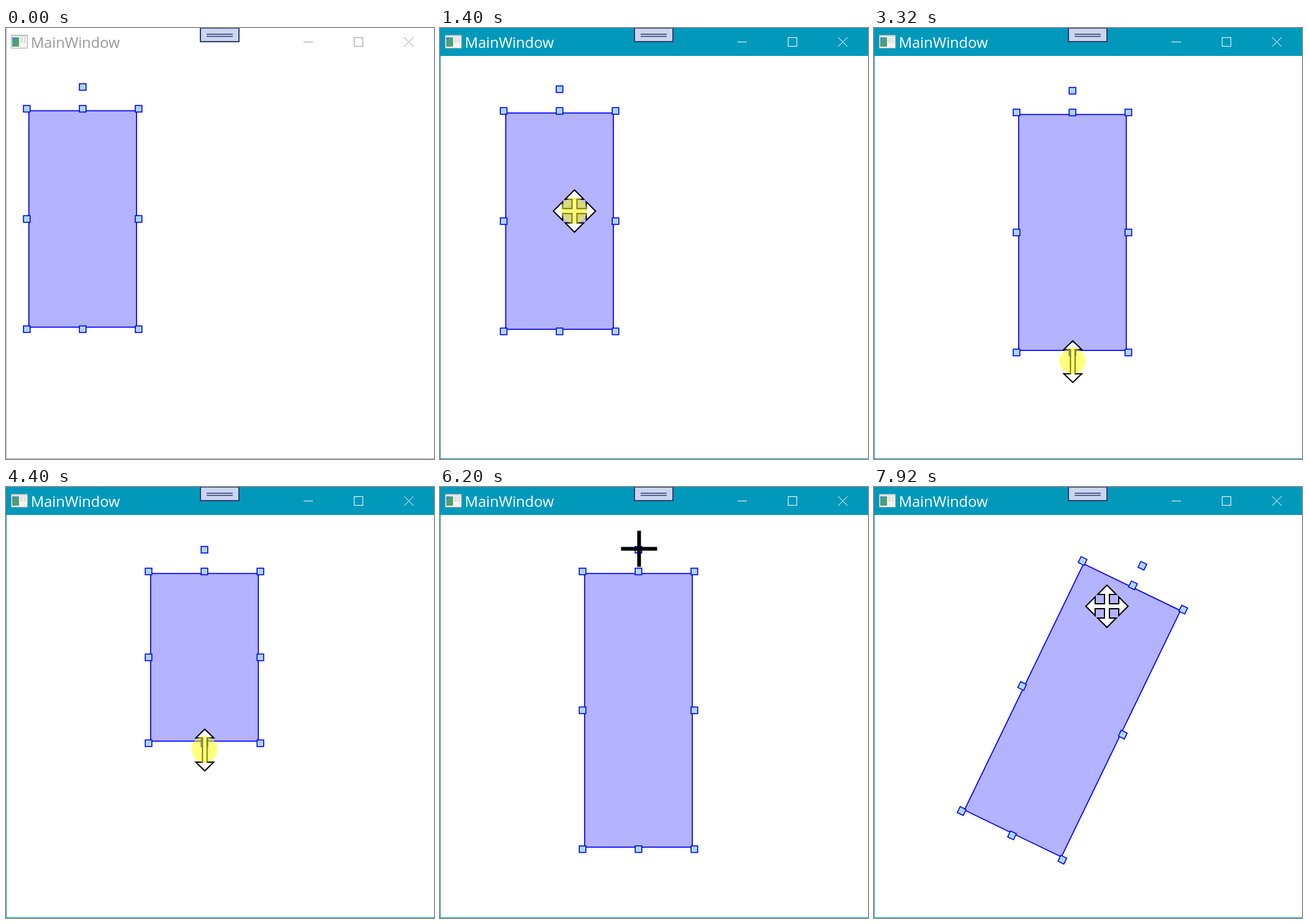
These frames come from a looping animation (689x694 px, 8 s). An HTML page:

```html
<!DOCTYPE html>
<html lang="en">
<head>
<meta charset="utf-8">
<title>MainWindow</title>
<style>
  html, body { margin: 0; width: 100%; height: 100%; overflow: hidden; background: #fff; }
  svg { display: block; width: 689px; height: 694px; --bar: #fff; --edge: #aaa; --ink: #999; }
  svg.active { --bar: #0099bc; --edge: #0099bc; --ink: #fff; }
  .bar { fill: var(--bar); }
  .edge { fill: var(--edge); }
  .title { fill: var(--ink); font: 23.5px "Open Sans", "Noto Sans", sans-serif; }
  .buttons { fill: none; stroke: var(--ink); }
  .body { fill: #b3b3ff; stroke: #00f; stroke-width: 1.7; }
  .handle { fill: #add8e6; stroke: #00f; stroke-width: 1.6; }
  .tab { fill: #ccd5f0; stroke: #343c6c; stroke-width: 2; }
</style>
</head>
<body>
<svg id="stage" viewBox="0 0 689 694">
  <rect width="689" height="694" fill="#fff"/>
  <rect class="bar" width="689" height="45"/>
  <path class="edge" d="M0 0H1V693H689V694H0z"/>
  <g>
    <rect x="8.5" y="11.5" width="26" height="21" fill="#f4f4f2" stroke="#aaa"/>
    <path d="M9 12H34V14H9z" fill="#d5d9dd"/>
    <path d="M10 15H21V30H10z" fill="#4a9c9c"/>
    <path d="M10 24L21 17V30H10z" fill="#4f9f72"/>
    <path d="M10 15H15L10 22z" fill="#4c86b4"/>
    <path d="M23 16.5H27M23 19.5H27M23 22.5H27M29 16.5H32M29 19.5H32M29 22.5H32" stroke="#b5bbb8"/>
  </g>
  <text class="title" x="40" y="32">MainWindow</text>
  <g class="buttons">
    <path d="M479 22.5H494M641 15L656 30M656 15L641 30"/>
    <rect x="560.5" y="15.5" width="14" height="14"/>
  </g>
  <rect class="tab" x="313" y="0" width="62" height="22"/>
  <path d="M323 10H365M323 13.5H365" stroke="#343c6c" stroke-width="1.5"/>
  <g id="shape"><rect id="body" class="body" x="-86.7" width="173.4"/></g>
  <g id="cursor">
    <path id="pointer" stroke="#000" stroke-width="2"/>
    <circle id="press" cx="-.5" cy="-1" r="21" fill="#ff0" fill-opacity=".5"/>
  </g>
</svg>
<script>
const $ = id => document.getElementById(id);
const LOOP = 8000, RAD = Math.PI / 180;
const GAP = 3.3, STEM = 35, LEAD = 0.4;

const pointers = {
  arrow: 'M1 1V49L12 39L19 56L26 53L19 36H34z',
  move: 'M0-34L15-19H4V-4H19V-15L34 0L19 15V4H4V19H15L0 34L-15 19H-4V4H-19V15L-34 0L-19-15V-4H-4V-19H-15z',
  size: 'M0-33.5L14.5-19.5H3.7V19.5H14.5L0 33.5L-14.5 19.5H-3.7V-19.5H-14.5z',
  cross: 'M-28.5-1.5H-2.5V-27.5H3.5V-1.5H29.5V4.5H3.5V30.5H-2.5V4.5H-28.5z'
};

const smooth = s => s * s * (3 - 2 * s);
const swing = s => Math.sin(s * Math.PI / 2);
const settle = s => 1 - (1 - s) ** 3;

// Times are in tenths of a second
function ramp(k, from, to, ease = smooth) {
  return ease(Math.min(1, Math.max(0, (k - from) / (to - from))));
}

function glide(k, from, to, [x0, y0], [x1, y1], ease, bow = 0) {
  const s = ramp(k, from, to, ease);
  return [x0 + (x1 - x0) * s + bow * Math.sin(s * Math.PI), y0 + (y1 - y0) * s];
}

// Dragged across, stretched, squeezed, stretched again, then turned
function shapeAt(k) {
  const dx = 196 * ramp(k, 10, 20), dy = 6 * ramp(k, 10, 20, swing);
  const h = 348.4 + 85.6 * ramp(k, 30, 37.3) - 164 * ramp(k, 37.3, 44) + 170.6 * ramp(k, 44, 49);
  const angle = 25.8 * ramp(k, 66.4, 76, swing);
  return { dx, dy, h, angle, cx: 123.5 + dx, cy: 133.3 + dy + h / 2 };
}

// While a button is held the hand runs slightly ahead of the shape
const held = {
  move({ dx, dy }) { return [136 + dx, 291 + dy]; },
  size({ h }) { return [320, 150.4 + h]; },
  cross({ cx, cy, angle }) {
    const r = 261 + angle * 0.55, a = angle * 1.04 * RAD;
    return [cx + r * Math.sin(a), cy - r * Math.cos(a)];
  }
};
const grab = (kind, k) => held[kind](shapeAt(k + LEAD));

const below = [321, 518], above = [321, 92], knob = [320, 98];
const stages = [
  { start: 2, at: k => glide(k, 2, 9, [473, 598], grab('move', 9)) },
  { start: 11, drag: 'move' },
  { start: 20, at: k => glide(k, 20, 26, grab('move', 20), below) },
  { start: 26, at: k => glide(k, 26, 28, below, grab('size', 28)) },
  { start: 31, drag: 'size' },
  { start: 49, at: k => glide(k, 50, 55.7, grab('size', 49), above, settle, 46) },
  { start: 59, at: k => glide(k, 59, 61, above, knob) },
  { start: 66, drag: 'cross' },
  { start: 78, at: k => glide(k, 77, 79, grab('cross', 77), [375, 192]) }
];

// Pointer for whatever lies under a free cursor
function hover([px, py], { cx, cy, h, angle }) {
  const c = Math.cos(angle * RAD), s = Math.sin(angle * RAD);
  const x = (px - cx) * c + (py - cy) * s, y = (py - cy) * c - (px - cx) * s;
  const near = edge => Math.abs(x) < 8 && Math.abs(y - edge) < 8;
  if (near(-h / 2 - GAP - STEM)) return 'cross';
  if (near(h / 2 + GAP)) return 'size';
  return Math.abs(x) < 87 && Math.abs(y) < h / 2 ? 'move' : 'arrow';
}

function set(node, attrs) {
  for (const name in attrs) node.setAttribute(name, attrs[name]);
}

const grips = [];
function addGrip(x, y, stem = 0) {
  const node = document.createElementNS('http://www.w3.org/2000/svg', 'rect');
  set(node, { class: 'handle', x: x * 90 - 5.3, width: 10.6, height: 10.6 });
  $('shape').append(node);
  grips.push({ node, y, stem });
}
for (const x of [-1, 0, 1]) for (const y of [-1, 0, 1]) if (x || y) addGrip(x, y);
addGrip(0, -1, STEM);

// Ten pictures a second, on a slightly uneven beat
function tick(ms) {
  return 2 * Math.floor(ms / 200) + (ms % 200 >= (ms < 3000 ? 80 : 120) ? 1 : 0);
}

function draw(k) {
  const shape = shapeAt(k), { cx, cy, h, angle } = shape;
  $('stage').classList.toggle('active', k >= 11);
  set($('shape'), { transform: `translate(${cx} ${cy}) rotate(${angle})` });
  set($('body'), { y: -h / 2, height: h });
  for (const { node, y, stem } of grips) set(node, { y: y * (h / 2 + GAP + stem) - 5.3 });

  const stage = stages.findLast(({ start }) => start <= k);
  $('cursor').style.display = stage ? '' : 'none';
  if (!stage) return;
  const spot = stage.drag ? grab(stage.drag, k) : stage.at(k);
  const kind = stage.drag || hover(spot, shape);
  const cross = kind === 'cross';
  set($('cursor'), { transform: `translate(${spot})` });
  set($('pointer'), {
    d: pointers[kind],
    fill: cross ? '#000' : '#fff',
    'stroke-opacity': cross ? 0 : 1
  });
  $('press').style.display = stage.drag ? '' : 'none';
}

const start = performance.now();
function frame() {
  draw(tick((performance.now() - start) % LOOP));
  requestAnimationFrame(frame);
}
frame();
</script>
</body>
</html>
```
